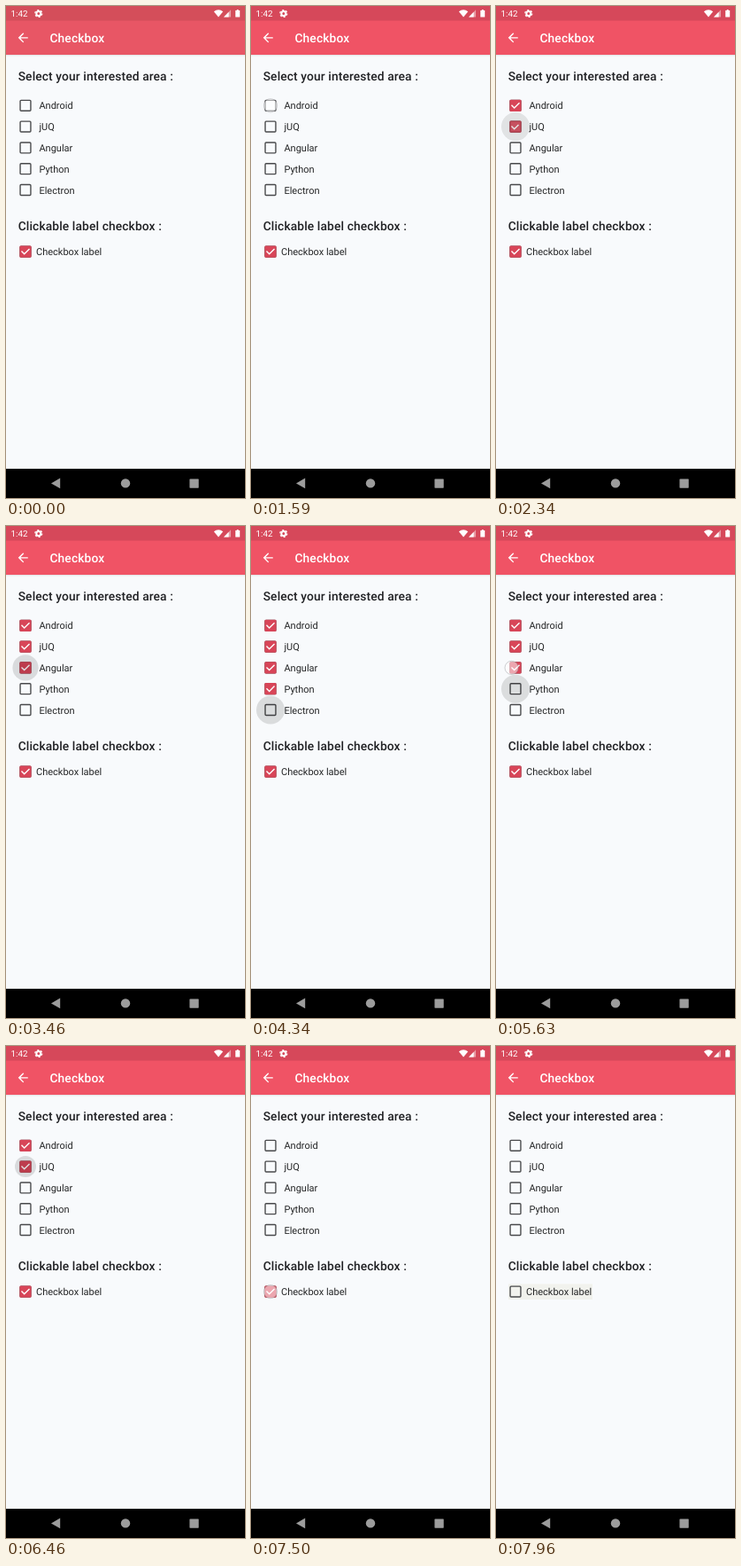
These frames come from a looping animation (270 by 555 pixels, 8 s). An HTML page:

```html
<!DOCTYPE html>
<html lang="en">
<head>
<meta charset="utf-8">
<title>Checkbox</title>
<style>
  html, body { margin: 0; width: 100%; height: 100%; overflow: hidden; background: #f8fafc; }
  svg { display: block; width: 270px; height: 555px; font-family: Roboto, sans-serif; text-rendering: geometricPrecision; }
  .head { font-size: 13.77px; font-weight: 500; letter-spacing: .12px; fill: #202124; }
  .label { font-size: 11px; fill: #242526; }
</style>
</head>
<body>
<svg viewBox="0 0 270 555">
  <defs>
    <linearGradient id="shade" x2="0" y2="1">
      <stop stop-color="#000" stop-opacity=".1"/>
      <stop offset="1" stop-color="#000" stop-opacity="0"/>
    </linearGradient>
  </defs>
  <rect width="270" height="555" fill="#f8fafc"/>
  <rect y="55" width="270" height="2" fill="url(#shade)"/>
  <rect id="bar" y="16" width="270" height="39"/>
  <rect id="status" width="270" height="16.5"/>

  <g fill="#fff">
    <text x="5.5" y="12.2" font-size="9.8">1:42</text>
    <g fill="none" stroke="#fff">
      <circle cx="36.8" cy="8.5" r="2.5" stroke-width="2"/>
      <circle cx="36.8" cy="8.5" r="4" stroke-width="1.2" stroke-dasharray="2.1 2.09"/>
    </g>
    <path d="M234.8 6.3Q240 2.2 245.2 6.3L240 12.4Z"/>
    <path d="M246 12.4L254 4.2V12.4Z" opacity=".45"/>
    <path d="M246 12.4L251.6 6.7V12.4Z"/>
    <path d="M259.2 5H260.8V4H262.6V5H264.2V12.6H259.2Z"/>
    <path transform="translate(11 27.6) scale(.688)" d="M20 11H7.83l5.59-5.59L12 4l-8 8 8 8 1.41-1.41L7.83 13H20v-2z"/>
    <text class="head" x="49.5" y="41" style="fill:#fff">Checkbox</text>
  </g>

  <text class="head" x="13.7" y="83.5">Select your interested area :</text>
  <text class="head" x="13.7" y="253.3">Clickable label checkbox :</text>
  <rect id="glow" x="14" y="268.5" width="95" height="17.5" fill="#e6e7d5"/>
  <g id="rows"></g>
  <g id="ripples"></g>
  <circle id="touch" r="7.6" fill="#fff" fill-opacity=".52" stroke="#8a8a8e" stroke-opacity=".5" stroke-width=".8"/>

  <rect y="522" width="270" height="33"/>
  <g fill="#9c9c9c">
    <path d="M51 538.4L61.2 532.6V544.2Z"/>
    <circle cx="135" cy="538.4" r="5.2"/>
    <rect x="207.4" y="533.4" width="10.3" height="10.3" rx=".6"/>
  </g>
</svg>
<script>
const LOOP = 8000, CX = 22, LABEL = 5;
const $ = id => document.getElementById(id);
const rowY = i => i === LABEL ? 277.1 : 112.3 + 23.8 * i;
const ramp = (t, a, b) => Math.min(1, Math.max(0, (t - a) / (b - a)));

function add(parent, tag, attrs, text) {
  const el = document.createElementNS('http://www.w3.org/2000/svg', tag);
  for (const k in attrs) el.setAttribute(k, attrs[k]);
  if (text) el.textContent = text;
  return parent.appendChild(el);
}

const tap = (row, down, grow, toggle, end, max = 16, dx = 0) =>
  ({ row, down, grow, toggle, end, max, dx });

const taps = [
  tap(0, 1590, 1650, 1730, 1980),
  tap(1, 2030, 2070, 2270, 2590),
  tap(2, 3170, 3355, 3370, 3660),
  tap(3, 3560, 3620, 3720, 3940),
  tap(4, 3950, 4040, 4390, 4540),
  tap(4, 4750, 4810, 4960, 5260),
  tap(3, 5440, 5500, 5540, 5860),
  tap(2, 5620, 5700, 5840, 6120, 16, -4.4),
  tap(1, 6310, 6380, 6480, 6680, 12),
  tap(0, 6580, 6640, 6740, 6960),
  tap(LABEL, 7500, 0, 7720, 0)
];

const names = ['Android', 'jUQ', 'Angular', 'Python', 'Electron', 'Checkbox label'];
const square = (y, size) => ({ x: CX - size / 2, y: y - size / 2, width: size, height: size });
const boxes = names.map((name, i) => {
  const y = rowY(i), rows = $('rows');
  add(rows, 'text', { class: 'label', x: i === LABEL ? 34 : 37.4, y: y + 4.1 }, name);
  add(rows, 'rect', { ...square(y, 11.9), rx: 1, fill: 'none', stroke: '#48494b', 'stroke-width': 1.38 });
  const on = add(rows, 'g', {});
  add(on, 'rect', { ...square(y, 13.2), rx: 1.2, fill: '#d84558' });
  const mark = add(on, 'path', {
    d: `M${CX - 4.5} ${y - .5}l3.2 3.2 5.8-5.8`, pathLength: 1, 'stroke-dasharray': '1 2',
    fill: 'none', stroke: '#fff', 'stroke-width': 1.38
  });
  return { on, mark };
});

for (const p of taps) {
  if (p.row !== LABEL) p.el = add($('ripples'), 'circle', { cx: CX, cy: rowY(p.row) });
}

const mix = (a, b, k) => `rgb(${a.map((v, i) => Math.round(v + (b[i] - v) * k))})`;

function draw(t) {
  const settle = ramp(t, 40, 590);
  $('bar').setAttribute('fill', mix([232, 86, 101], [240, 83, 101], settle));
  $('status').setAttribute('fill', mix([212, 78, 90], [214, 72, 90], settle));

  const level = names.map((_, i) => i === LABEL ? 1 : 0);
  let finger = null;
  for (const p of taps) {
    const k = ramp(t, p.toggle, p.toggle + 80);
    const start = level[p.row];
    level[p.row] += (start > .5 ? -1 : 1) * k;
    if (t >= p.down && t < p.down + 110) finger = p;
    if (!p.el) continue;
    const hold = Math.max(p.grow + 130, p.toggle);
    p.el.setAttribute('r', Math.min(p.max, 4 + 12 * ramp(t, p.grow, p.grow + 120)));
    p.el.setAttribute('opacity', t < p.grow ? 0 : .12 * (1 - ramp(t, hold, p.end)));
  }

  boxes.forEach((b, i) => {
    const k = Math.min(1, Math.max(0, level[i]));
    b.on.setAttribute('opacity', k);
    b.mark.setAttribute('stroke-dashoffset', 1 - k);
  });

  const touch = $('touch');
  touch.setAttribute('opacity', finger ? 1 - ramp(t, finger.down + 50, finger.down + 110) : 0);
  if (finger) {
    touch.setAttribute('cx', CX + finger.dx);
    touch.setAttribute('cy', rowY(finger.row));
  }
  $('glow').setAttribute('opacity', ramp(t, 7560, 7680) * (1 - .6 * ramp(t, 7780, 7960)));
}

function frame() {
  draw(performance.now() % LOOP);
  requestAnimationFrame(frame);
}
frame();
</script>
</body>
</html>
```
